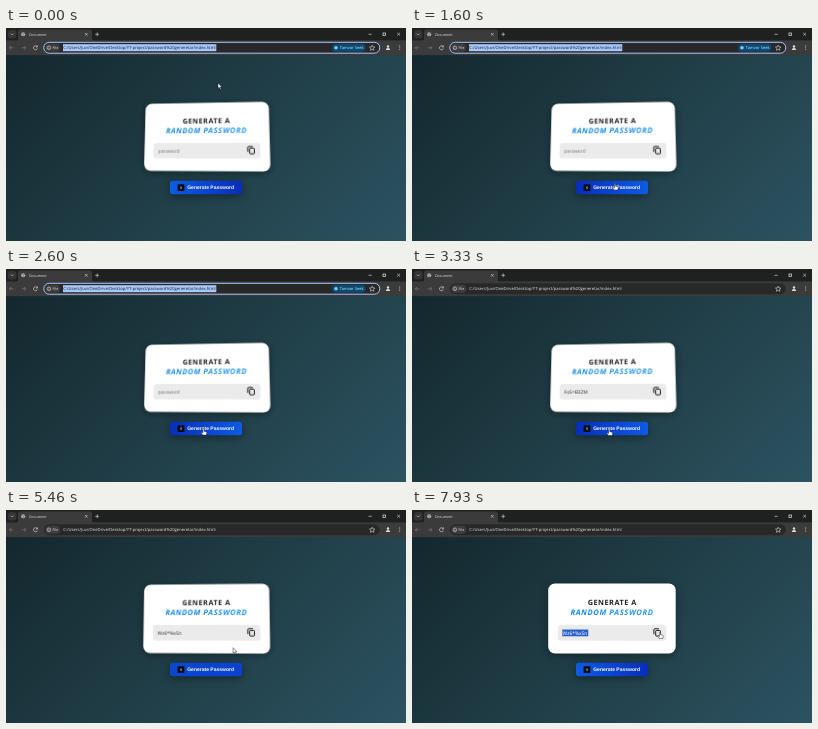
An HTML page that plays this animation: 400 px wide and 213 px high, repeating every 8 s.

```html
<!DOCTYPE html>
<html lang="en">
<head>
<meta charset="utf-8">
<title>Password generator</title>
<style>
  html, body { margin: 0; width: 100%; height: 100%; overflow: hidden; background: #1d363f; }
  .stage { position: relative; width: 100%; height: 100%; overflow: hidden; contain: paint; }
  svg { position: absolute; left: 0; top: 0; width: 400px; height: 213px; text-rendering: geometricPrecision; }
  text { font-family: "Open Sans", "Noto Sans", sans-serif; white-space: pre; }
  .page { position: absolute; top: 27px; bottom: 0; width: 100%;
    background: linear-gradient(135deg, #14272e, #203e47 50%, #2c5361); }
  .line { fill: none; stroke: #c8c8c8; stroke-width: .7; }
  .dim { stroke: #777; }
  .ui { fill: #e6e6e6; font-size: 4px; }
  #card { transform-origin: 200px 108.5px; }
  .shadow { filter: drop-shadow(0 2px 4px #0006); }
  .title { font: 700 7.3px "Noto Sans", "Open Sans", sans-serif; letter-spacing: .5px; }
  .accent { font-size: 7.7px; font-style: italic; letter-spacing: .58px; }
  .field { font: 4.9px "Noto Sans", "Open Sans", sans-serif; }
  .label { font: 700 5.03px "Liberation Sans", Arial, sans-serif; fill: #fff; }
</style>
</head>
<body>
<div class="stage">
<div class="page"></div>

<svg viewBox="0 0 400 213">
  <rect width="400" height="13" fill="#1f2020"/>
  <rect y="12.4" width="400" height="14.8" fill="#3b3b3b"/>
  <rect x="2" y="2" width="8.5" height="8.5" rx="2.5" fill="#343535"/>
  <path class="line" d="M4.8 5.6l1.4 1.4 1.4-1.4"/>
  <path d="M10 13q2 0 2-2V4q0-2.5 2.5-2.5h69Q86 1.5 86 4v7q0 2 2 2z" fill="#3b3b3b"/>
  <circle cx="17.2" cy="6.3" r="2" fill="#b9bcc0"/>
  <path d="M15.5 5.5l2 .6-.4 1.8M17.7 4.4l.4 1 1.1.4" class="line" style="stroke:#555;stroke-width:.6"/>
  <text class="ui" x="23" y="7.7" style="font-size:3.6px">Document</text>
  <path class="line" d="M79 5l2.6 2.6m0-2.6L79 7.6M89.3 6.3h3.8m-1.9-1.9v3.8M362.5 6.3h3.2M391.2 4.8l2.8 2.8m0-2.8l-2.8 2.8"/>
  <rect class="line" x="377" y="5" width="2.6" height="2.6" style="stroke:#eee"/>
  <path class="line" d="M31.2 18.7a2 2 0 1 0 .2 1.7M31.4 17.4v1.6h-1.6"/>
  <path class="line dim" d="M7.4 19.8H3.2m1.9-1.9l-1.9 1.9 1.9 1.9M15.8 19.8h4.2m-1.9-1.9l1.9 1.9-1.9 1.9"/>
  <rect id="pill" x="37.8" y="14.3" width="336" height="10.9" rx="5.45" fill="#282828" stroke-width="1"/>
  <rect x="39.3" y="15.8" width="14.8" height="7.9" rx="3.9" fill="#3d3d3d"/>
  <circle class="line" cx="42.9" cy="19.8" r="1.8"/>
  <path class="line" d="M42.9 19.5v1.3M42.9 18.5v.4"/>
  <text class="ui" x="46.4" y="21.2" style="font-size:3.7px">File</text>
  <rect id="urlMark" x="57" y="16.2" width="153.3" height="7" fill="#a8c7fa"/>
  <text id="url" x="57.3" y="21.3" font-size="4.17">C:/Users/Juvi/OneDrive/Desktop/YT-project/password%20generetar/index.html</text>
  <g id="chip">
    <rect x="326" y="15.8" width="33.5" height="7.9" rx="3.9" fill="#0b4a72"/>
    <circle cx="330" cy="19.8" r="1.8" fill="#8cc4f5"/>
    <text class="ui" x="333.8" y="21.2" style="fill:#cfe6ff">Tamvor Seek</text>
  </g>
  <path class="line" d="M366.2 17.2l.8 1.7 1.9.2-1.4 1.3.4 1.9-1.7-1-1.7 1 .4-1.9-1.4-1.3 1.9-.2z"/>
  <circle cx="382" cy="18.5" r="1.2" fill="#ddd"/>
  <path d="M379.8 22q0-1.9 2.2-1.9t2.2 1.9z" fill="#ddd"/>
  <path d="M393.3 17.6h.8v.8h-.8zm0 1.8h.8v.8h-.8zm0 1.8h.8v.8h-.8z" fill="#ddd"/>
</svg>

<svg id="card" viewBox="0 0 400 213">
  <defs>
    <linearGradient id="ink" gradientUnits="userSpaceOnUse" spreadMethod="reflect" x1="158" x2="242" y1="0" y2="0">
      <stop stop-color="#1386e4"/><stop offset="1" stop-color="#2f9df0"/>
    </linearGradient>
  </defs>
  <rect class="shadow" x="136.2" y="73.5" width="127.5" height="70" rx="6.8" fill="#fff"/>
  <text class="title" x="200.2" y="94.9" text-anchor="middle" fill="#222">GENERATE A</text>
  <text class="title accent" x="200" y="105" text-anchor="middle" fill="url(#ink)">RANDOM PASSWORD</text>
  <rect x="145.8" y="115" width="108.5" height="15.8" rx="3.4" fill="#ebebeb"/>
  <rect id="mark" x="150.3" y="119.5" width="26" height="6.8" fill="#2a62c9"/>
  <text id="field" class="field" x="150.6" y="124.7"></text>
  <g fill="none" stroke="#111" stroke-width=".95">
    <path d="M241.9 124.2v-4.6q0-.8.8-.8h4.2"/>
    <rect x="243.7" y="120.5" width="4.7" height="5.6" rx=".7"/>
  </g>
</svg>

<svg viewBox="0 0 400 213">
  <defs>
    <linearGradient id="blue">
      <stop id="blueLeft"/><stop id="blueRight" offset="1"/>
    </linearGradient>
  </defs>
  <rect class="shadow" x="164" y="152.7" width="72" height="13.6" rx="2.8" fill="url(#blue)"/>
  <rect x="171.6" y="156.2" width="6.8" height="6.8" rx=".6" fill="#0a0d14"/>
  <path d="M175.3 158.2l-1 1.5h1.4l-.8 1.4" fill="none" stroke="#d8dde8" stroke-width=".55"/>
  <text class="label" x="181.2" y="161.3">Generate Password</text>
  <g id="cursor" stroke="#111" stroke-width=".45" stroke-linejoin="round" fill="#fff">
    <path id="arrow" d="M0 0v5.4l1.3-1.1.9 2 .9-.4-.9-1.9h1.7z"/>
    <path id="hand" d="M-.6.5q.6-.8 1.2 0v2.2l2.1.5q.7.3.6 1.1l-.5 2.2H-.8l-1.6-2.3q.2-.8 1-.4l.8.6z"/>
  </g>
</svg>
</div>

<script>
const LOOP = 8000;
const $ = id => document.getElementById(id);

// Pointer path: time, x, y
const pointerKeys = [
  [0, 212, 55], [80, 212, 55], [820, 203.5, 155.5], [1600, 203, 155.5], [1770, 202, 138],
  [1900, 202, 138], [2060, 201, 153.3], [2700, 197.3, 160], [5260, 197.3, 160], [5620, 248, 122]
];
// Card flatness: time, 0 tilted .. 1 facing the viewer
const flatKeys = [
  [0, 0], [240, 0], [480, 1], [640, 1], [900, 0], [1650, 0], [1850, 1],
  [2060, 1], [2350, 0], [5330, 0], [5620, 1]
];
// Button highlight: time, 0 resting .. 1 hovered
const glowKeys = [
  [0, 0], [780, 0], [1100, 1], [1650, 1], [1900, 0], [2060, 0], [2360, 1], [5300, 1], [5600, 0]
];
// Press and release times with the password each click produces
const clicks = [
  [2700, 2850, "Fo5=B3ZM"], [3780, 3900, "Fy8rX+DC"], [4480, 4620, "Wz6*%xSn"]
];
const COPY_AT = 6250;

const BLUE_LIGHT = [13, 91, 228], BLUE_DARK = [8, 46, 184], BLUE_PRESSED = [7, 58, 203];

function sample(keys, t) {
  const next = keys.findIndex(k => k[0] > t);
  if (next < 0) return keys[keys.length - 1].slice(1);
  const a = keys[next - 1], b = keys[next];
  const u = (t - a[0]) / (b[0] - a[0]), eased = u * u * (3 - 2 * u);
  return a.slice(1).map((v, i) => v + (b[i + 1] - v) * eased);
}

const mix = (a, b, u) => `rgb(${a.map((v, i) => Math.round(v + (b[i] - v) * u))})`;
const show = (id, visible) => $(id).style.display = visible ? "" : "none";

function render(t) {
  const [x, y] = sample(pointerKeys, t);
  const [flat] = sample(flatKeys, t);
  const tilt = 1 - flat;
  $("card").style.transform =
    `perspective(208px) rotateX(${5 * tilt}deg) rotateY(${-4 * tilt}deg) scale(${1 - .02 * tilt})`;

  const onButton = x > 164 && x < 236 && y > 152.7 && y < 166.3;
  const onCopy = x > 240 && x < 251 && y > 116 && y < 128;
  $("cursor").setAttribute("transform", `translate(${x} ${y})`);
  show("hand", onButton || onCopy);
  show("arrow", !onButton && !onCopy);

  // Hovering reverses the button gradient
  const [glow] = sample(glowKeys, t);
  const pressed = clicks.some(([down, up]) => t >= down && t < up);
  const [light, dark] = pressed ? [BLUE_PRESSED, BLUE_PRESSED] : [BLUE_LIGHT, BLUE_DARK];
  $("blueLeft").setAttribute("stop-color", mix(light, dark, glow));
  $("blueRight").setAttribute("stop-color", mix(dark, light, glow));
  $("ink").setAttribute("gradientTransform", `translate(${20 * Math.sin(t / LOOP * 4 * Math.PI)} 0)`);

  const urlFocused = t < clicks[0][0];
  show("urlMark", urlFocused);
  show("chip", urlFocused);
  $("pill").setAttribute("stroke", urlFocused ? "#a8c7fa" : "none");
  $("url").setAttribute("fill", urlFocused ? "#15202c" : "#e6e6e6");

  const done = clicks.filter(c => t >= c[1]).pop();
  const copied = t >= COPY_AT;
  $("field").textContent = done ? done[2] : "password";
  $("field").setAttribute("fill", copied ? "#fff" : done ? "#333" : "#757575");
  show("mark", copied);
}

const start = performance.now();
function tick() {
  render((performance.now() - start) % LOOP);
  requestAnimationFrame(tick);
}
tick();
</script>
</body>
</html>
```
